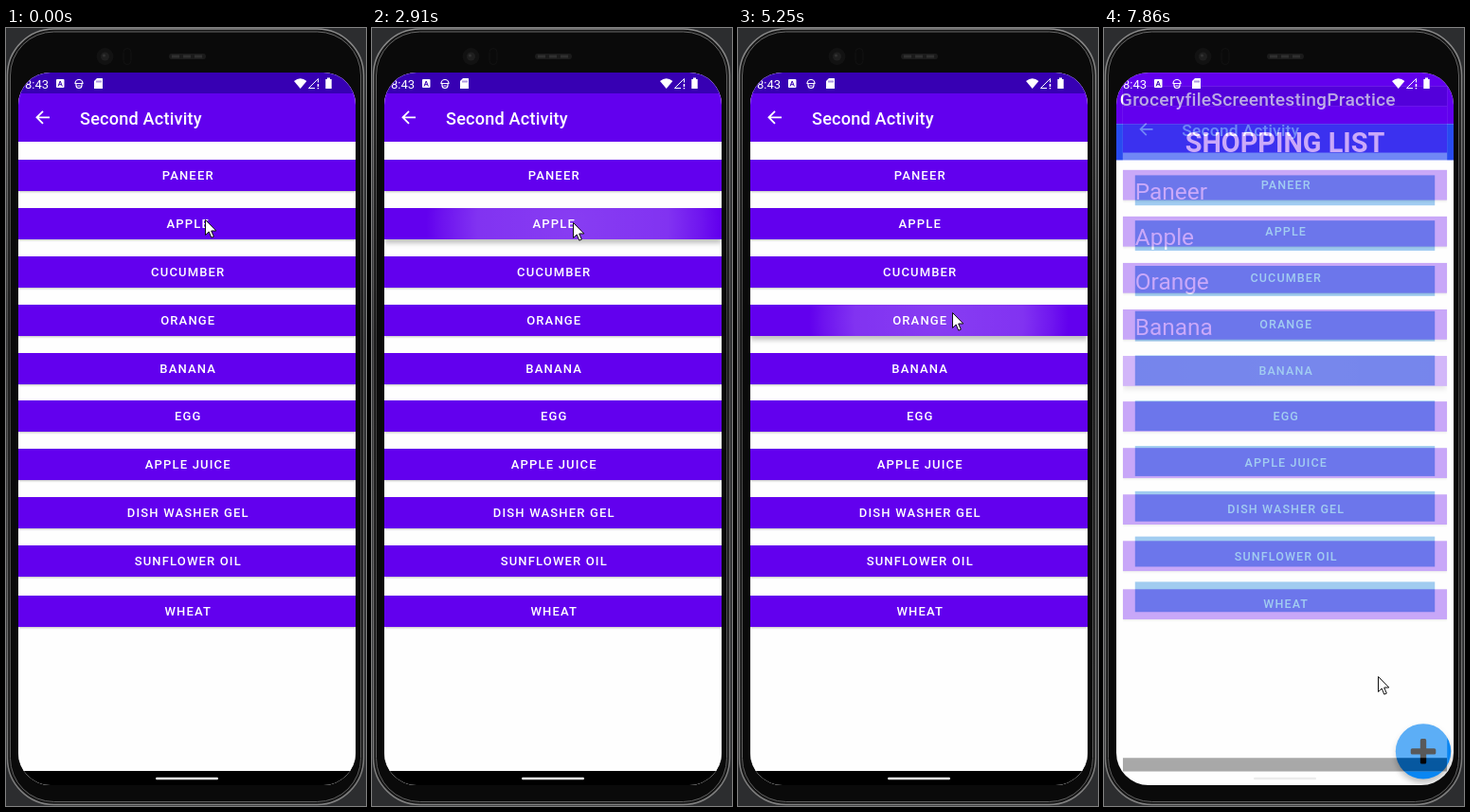
These frames come from a looping animation (380x821 px, 7.99 s). An HTML page:

```html
<!DOCTYPE html>
<html lang="en">
<head>
<meta charset="utf-8">
<title>Grocery picker</title>
<style>
html, body { margin: 0; width: 100%; height: 100%; overflow: hidden; background: #2c2d2f; }
#stage { position: absolute; left: 0; top: 0; width: 380px; height: 821px; overflow: hidden; font-family: Roboto, "Noto Sans", sans-serif; }
#stage > svg, #bar { position: absolute; left: 0; top: 0; }
#screen { position: absolute; left: 13px; top: 47px; width: 356px; height: 752px; border-radius: 34px; overflow: hidden; background: #000; }
.win, #dim { position: absolute; inset: 0; }
.win { transform-origin: 50% 50%; background: #fefefe; overflow: hidden; }
#dim { background: #000; }
.box { position: absolute; white-space: pre; color: #fff; }
.status { background: #3700b3; }
.app { background: #6200ee; }
.nav { background: #000; }
.title { font-size: 18.1px; font-weight: 500; letter-spacing: .2px; }
.head { font-size: 27.2px; font-weight: 700; text-align: center; background: #284bf0; }
.row { font-size: 23px; background: #72b3ea; }
.btn { font-size: 13px; font-weight: 500; letter-spacing: 1.16px; text-indent: 2.5px; text-align: center; background: #6200ee; box-shadow: 0 1px 2px rgba(0,0,0,.25); }
.wave { position: absolute; inset: 0; opacity: 0; }
.fab { border-radius: 50%; background: #0a86f2; box-shadow: 0 4px 6px rgba(0,0,0,.25); }
.fab .wave { border-radius: 50%; background: #fff; }
#cursor { overflow: visible; }
</style>
</head>
<body>
<div id="stage">
  <svg width="380" height="821" fill="none">
    <defs>
      <linearGradient id="rim" x1="0" y1="0" x2="0" y2="1">
        <stop offset="0" stop-color="#8a8a8a"/>
        <stop offset=".4" stop-color="#4a4a4a"/>
        <stop offset="1" stop-color="#808080"/>
      </linearGradient>
    </defs>
    <rect x="1.500" y="1" width="376" height="818.500" rx="49" fill="#161616" stroke="url(#rim)" stroke-width="1.500"/>
    <rect x="4.500" y="4" width="370" height="812.500" rx="46" fill="#060606" stroke="url(#rim)" opacity=".7"/>
    <circle cx="104.500" cy="30" r="9" fill="#121212"/>
    <circle cx="104.500" cy="30" r="4.500" fill="#1f1f1f"/>
    <circle cx="103.500" cy="29" r="1.500" fill="#333"/>
    <rect x="124" y="21.500" width="8" height="17" rx="4" stroke="#121212"/>
    <rect x="172" y="27" width="39" height="6" rx="3" fill="#1b1b1b"/>
    <path d="M175 30h33" stroke="#303030" stroke-width="3" stroke-dasharray="8 4"/>
  </svg>
  <div id="screen">
    <div class="win" id="list"></div>
    <div id="dim"></div>
    <div class="win" id="picker"></div>
    <svg id="bar" width="356" height="752" viewBox="13 47 356 752" fill="#fff">
      <text x="20" y="63.500" font-size="13">8:43</text>
      <rect x="53" y="54" width="8.500" height="9" rx="1"/>
      <path d="M55 61.500l2.200-5.500 2.200 5.500M56 59.700h2.500" fill="none" stroke="#3700b3"/>
      <path d="M73 58.500a4 4 0 0 1 8 0zM74 58.500v2a3 3 0 0 0 6 0v-2M75.500 61h3" fill="none" stroke="#fff" stroke-width="1.200"/>
      <path d="M96 53h5.500q.5 0 .5.500v10q0 .5-.5.500h-8q-.5 0-.5-.5V56z"/>
      <path d="M96 55.500v2M98 55.500v2M100 55.500v2" stroke="#3700b3" stroke-width=".8"/>
      <path d="M304 56q6.700-5.500 13.400 0L310.700 64z"/>
      <path d="M319.500 63.500L329.500 53.500v4M319.500 63.500h6.500" fill="none" stroke="#fff"/>
      <path d="M328.700 59h1.500v3h-1.500zM328.700 63h1.500v1.300h-1.500z"/>
      <path d="M339 52.500h3V54h1.700v10h-6.400V54H339z"/>
      <rect x="158" y="790.800" width="66" height="2.400" rx="1.200" fill="#ececec"/>
    </svg>
  </div>
  <svg id="cursor" width="14" height="21">
    <path d="M.5.5V16.500L4.200 13 6.800 19.200 9.300 18.100 6.700 12H11.800Z" fill="#fff" stroke="#111"/>
  </svg>
</div>
<script>
const LOOP = 7990, SWITCH = 425, HOLD = 130;
const $ = id => document.getElementById(id);
const clamp = v => Math.max(0, Math.min(1, v));
const smooth = p => p * p * (3 - 2 * p);

const GOODS = ['Paneer', 'Apple', 'Cucumber', 'Orange', 'Banana', 'Egg',
  'Apple juice', 'Dish washer gel', 'Sunflower oil', 'Wheat'];

// Each visit to the picker: when it opens and closes, which item is tapped
const VISITS = [
  { open: -SWITCH, close: 630, item: 0 },
  { open: 1738, close: 2920, item: 1 },
  { open: 4090, close: 5400, item: 3 },
  { open: 6500, close: 7790, item: 4 }
];

// The picture is refreshed about every HOLD ms inside these spans, and rests between
const SPANS = [[0, 0], [150, 1070], [1220, 1340], [1610, 2540], [2660, 3700],
  [3960, 4850], [5250, 6150], [6450, 7440], [7590, 7860]];

// Pointer moves: start, duration, x, y
const HOME = [210, 202];
const MOVES = [
  [100, 200, 204, 160], [580, 220, 52.5, 554], [850, 220, 368, 744], [1180, 160, 351, 737],
  [1480, 130, 328, 744], [1738, 400, 212, 205], [2920, 600, 323, 743], [4090, 500, 226, 300],
  [5400, 600, 325, 745], [6500, 190, 204, 460], [6700, 250, 216, 355], [7725, 130, 289, 684]
];

// Places an element by stage coordinates; drop lowers the text a little
function box(parent, cls, x, y, w, h, text = '', drop = 0) {
  const el = document.createElement('div');
  el.className = 'box ' + cls;
  el.style.cssText = `left:${x - 13}px;top:${y - 47}px;width:${w}px;height:${h}px;line-height:${h + 2 * drop}px`;
  el.textContent = text;
  parent.append(el);
  return el;
}

function addWave(el) {
  const wave = document.createElement('div');
  wave.className = 'wave';
  el.append(wave);
  return wave;
}

function frame(win, title, x) {
  box(win, 'status', 13, 47, 356, 22);
  box(win, 'app', 13, 69, 356, 51);
  box(win, 'title', x, 70, 290, 50, title, .5);
  box(win, 'nav', 13, 784, 356, 15);
}

const list = $('list'), picker = $('picker'), dim = $('dim'), cursor = $('cursor');

frame(list, 'GroceryfileScreentestingPractice', 27);
box(list, 'head', 13, 120, 356, 36, 'SHOPPING LIST', 1);
const rows = GOODS.map((_, i) => box(list, 'row', 42, 171 + i * 44.85, 298, 30, '', 1.5));
const fab = box(list, 'fab', 300.5, 715.5, 55, 55);
fab.innerHTML = '<svg width="55" height="55" fill="#050505"><rect x="24.500" y="15" width="6" height="25" rx="1.500"/><rect x="15" y="24.500" width="25" height="6" rx="1.500"/></svg>';
const fabWave = addWave(fab);

frame(picker, 'Second Activity', 78);
box(picker, '', 31, 87, 16, 15).innerHTML =
  '<svg width="16" height="15" style="display:block"><path d="M15 7.300H1.500M8 .8L1.500 7.300 8 13.800" fill="none" stroke="#fff" stroke-width="1.800"/></svg>';
const buttons = GOODS.map((name, i) =>
  box(picker, 'btn', 13, 139.4 + i * 50.8 + (i === 9 ? 2.7 : 0), 356, 33, name.toUpperCase(), .75));
const waves = buttons.map(addWave);

function lastTick(clock) {
  const [a, b] = SPANS.filter(s => s[0] <= clock).pop();
  const steps = Math.round((b - a) / HOLD);
  if (!steps) return a;
  const gap = (b - a) / steps;
  return Math.min(b, a + gap * Math.floor((clock - a) / gap + .001));
}

const bez = (u, a, b, c, d) => {
  const v = 1 - u;
  return a * v * v * v + 3 * b * u * v * v + 3 * c * u * u * v + d * u * u * u;
};

// Fast start, very slow finish: two joined cubic curves
function ease(p) {
  if (p <= 0 || p >= 1) return clamp(p);
  const [xs, ys] = p < 1 / 6
    ? [[0, .05, .1333, 1 / 6], [0, 0, .06, .4]]
    : [[1 / 6, .2083, .25, 1], [.4, .82, 1, 1]];
  let lo = 0, hi = 1;
  for (let i = 0; i < 24; i++) {
    const mid = (lo + hi) / 2;
    if (bez(mid, ...xs) < p) lo = mid; else hi = mid;
  }
  return bez(lo, ...ys);
}

function place(win, scale, alpha) {
  win.style.transform = scale === 1 ? 'none' : `scale(${scale})`;
  win.style.opacity = alpha;
}

function drawScreens(t) {
  const { open, close } = VISITS.filter(v => v.open <= t).pop();
  if (t < close) {
    const age = t - open, e = ease(age / SWITCH);
    place(list, 1 + .05 * e, 1);
    place(picker, .85 + .15 * e, clamp((age - 20) / 50));
    dim.style.opacity = .2 * clamp(e * 2);
  } else {
    const age = t - close, e = ease(age / SWITCH);
    place(list, 1.1 - .1 * e, 1);
    place(picker, 1 - .1 * e, 1 - clamp((age - 15) / 83));
    dim.style.opacity = 0;
  }
  const bought = VISITS.filter(v => v.close <= t);
  rows.forEach((row, i) => { row.textContent = i < bought.length ? GOODS[bought[i].item] : ''; });
}

// Full strength at first, then fading out at the end of its life
const fade = (age, life) => age < 0 ? 0 : clamp((life - age) / 200) * (age < life);

function drawTaps(t) {
  let press = 0;
  waves.forEach((wave, i) => {
    const visit = VISITS.find(v => v.item === i);
    const age = visit ? t - visit.close + 280 : -1;
    const alpha = fade(age, 520);
    wave.style.opacity = alpha;
    buttons[i].style.boxShadow = alpha ? '0 4px 5px rgba(0,0,0,.25)' : '';
    if (alpha) wave.style.background = `radial-gradient(circle ${20 + .9 * age}px at 199px 16px,` +
      'rgba(255,255,255,.24),rgba(255,255,255,.2) 65%,rgba(255,255,255,.08) 88%,transparent)';
  });
  VISITS.forEach(v => { press = Math.max(press, fade(t - v.open + 200, 400)); });
  fabWave.style.opacity = .24 * press;
}

function drawCursor(t) {
  let [x, y] = HOME;
  for (const [start, time, toX, toY] of MOVES) {
    const p = smooth(clamp((t - start) / time));
    x += (toX - x) * p;
    y += (toY - y) * p;
  }
  cursor.style.transform = `translate(${x}px,${y}px)`;
}

const begin = performance.now();
function loop() {
  const t = lastTick((performance.now() - begin) % LOOP);
  drawScreens(t);
  drawTaps(t);
  drawCursor(t);
  requestAnimationFrame(loop);
}
loop();
</script>
</body>
</html>
```
